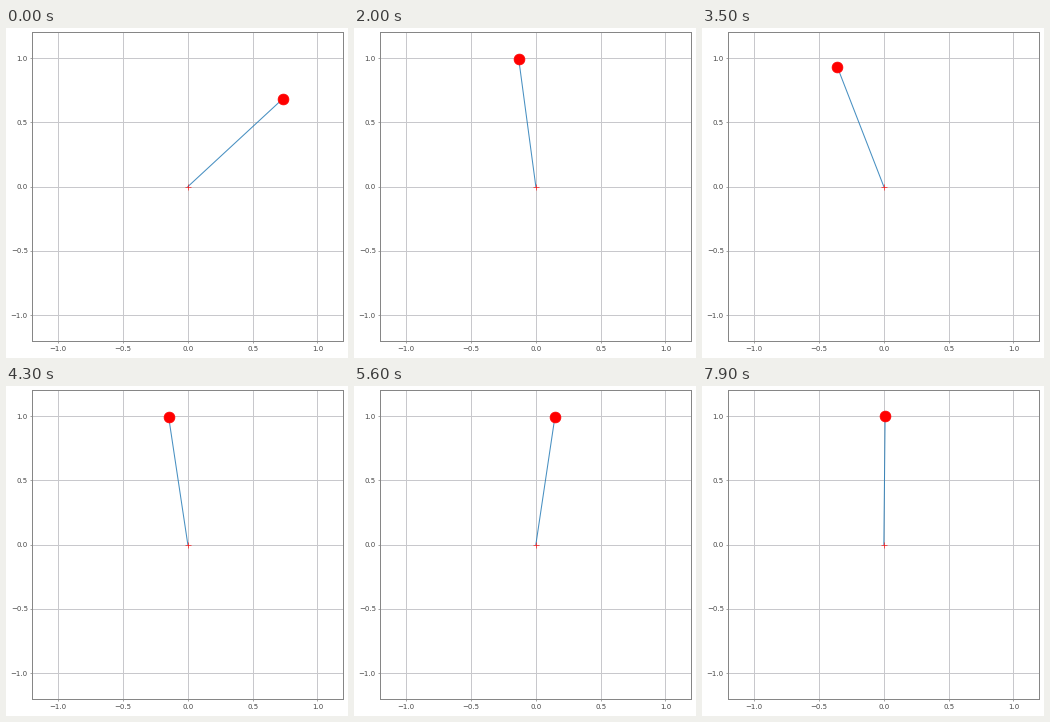
A matplotlib script that plays this animation: 342x330 px, repeating every 8000 ms.

```python
import matplotlib.pyplot as plt
import numpy as np
from matplotlib.animation import FuncAnimation

W, H, DPI = 342, 330, 100
FRAMES, STEP_MS = 80, 100
LEFT, RIGHT, TOP, BOTTOM = 26.4, 337.3, 4.3, 313.0

# Controlled pendulum: angle from upright, stiffening restoring torque
ANGLE, SPEED = 0.8208, 0.437
SPRING, STIFFEN, DAMPING = 1.04, 0.93, 0.58
SUBSTEPS = 10


def rate(state):
    a, v = state
    return np.array([v, -SPRING * a - STIFFEN * a**3 - DAMPING * v])


def rk4(state, dt):
    k1 = rate(state)
    k2 = rate(state + dt / 2 * k1)
    k3 = rate(state + dt / 2 * k2)
    k4 = rate(state + dt * k3)
    return state + dt / 6 * (k1 + 2 * k2 + 2 * k3 + k4)


def swing():
    state, angles = np.array([ANGLE, SPEED]), []
    dt = STEP_MS / 1000 / SUBSTEPS
    for _ in range(FRAMES):
        angles.append(state[0])
        for _ in range(SUBSTEPS):
            state = rk4(state, dt)
    return np.array(angles)


angles = swing()

plt.rcParams["font.family"] = "DejaVu Sans"
fig = plt.figure(figsize=(W / DPI, H / DPI), dpi=DPI, facecolor="white")
ax = fig.add_axes([LEFT / W, 1 - BOTTOM / H, (RIGHT - LEFT) / W, (BOTTOM - TOP) / H])
ax.set(xlim=(-1.2, 1.2), ylim=(-1.2, 1.2))
ticks = np.arange(-1, 1.1, 0.5)
ax.set_xticks(ticks)
ax.set_yticks(ticks)
ax.tick_params(length=1.7, width=0.5, color="#808080", labelsize=5, labelcolor="#484848")
ax.tick_params(axis="x", pad=2.2)
ax.tick_params(axis="y", pad=1.6)
ax.grid(color="#c8c8cc", lw=0.72)
for spine in ax.spines.values():
    spine.set(linewidth=0.72, edgecolor="#868686")

rod, = ax.plot([], [], color="C0", lw=0.75, alpha=0.82)
ax.plot(0, 0, "r+", ms=4.6, mew=0.5, alpha=0.85)
bob, = ax.plot([], [], "ro", ms=7.8, mew=0.5)


def draw(i):
    x, y = np.sin(angles[i]), np.cos(angles[i])
    rod.set_data([0, x], [0, y])
    bob.set_data([x], [y])
    return rod, bob


anim = FuncAnimation(fig, draw, frames=FRAMES, interval=STEP_MS, repeat=True)
plt.show()
```
